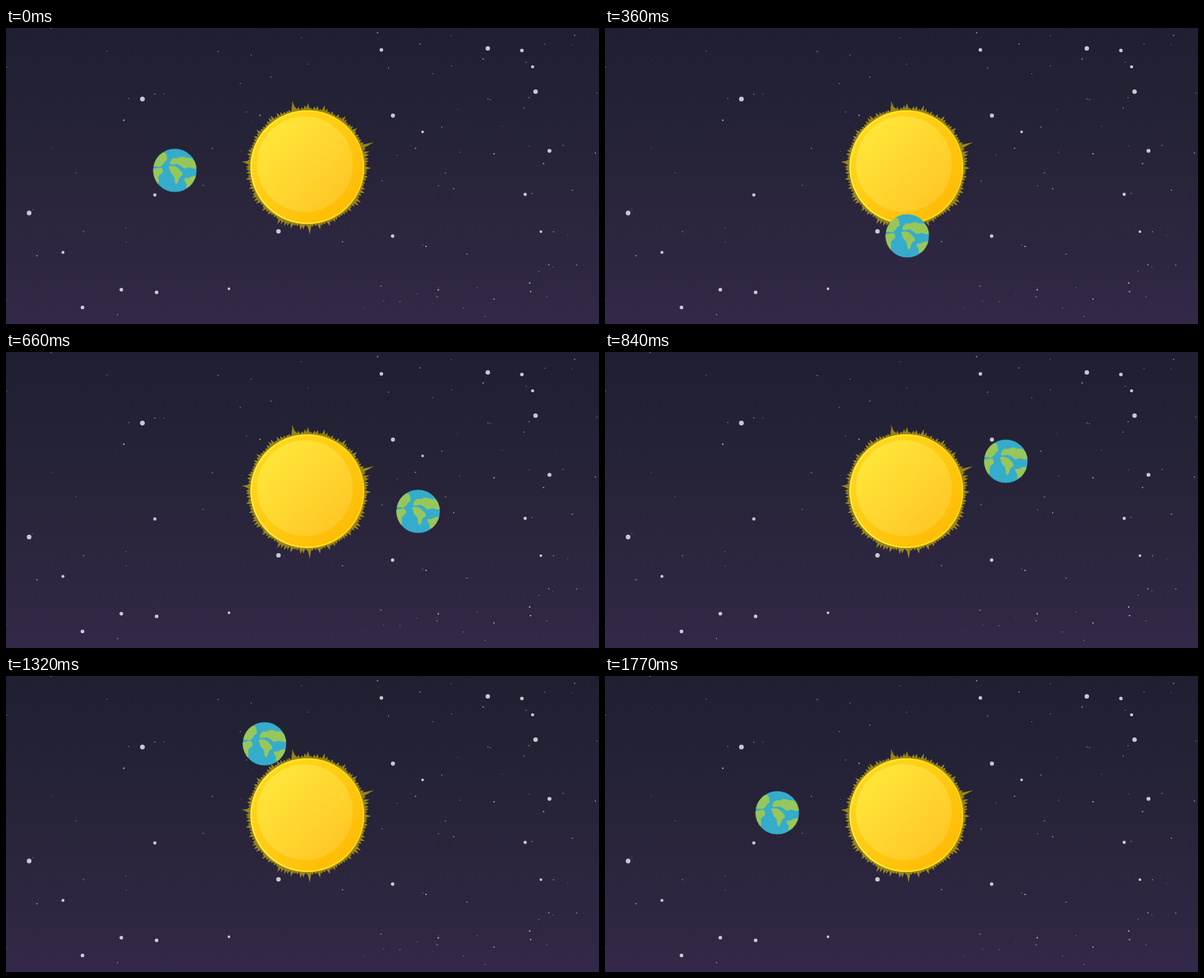
An HTML page for the animation above (1800 ms loop, 1000x500 px).

```html
<!DOCTYPE html>
<html lang="en">
<head>
<meta charset="utf-8">
<title>Planet orbit</title>
<style>
  html, body { margin: 0; width: 100%; height: 100%; overflow: hidden; }
  body { position: relative; background: linear-gradient(#1e2032, #282439 50%, #332848); }
  svg { position: absolute; left: 0; top: 0; }
  #sun { z-index: 1; }
</style>
</head>
<body>
<svg id="sky" width="1000" height="500" fill="#d8d5dc"></svg>

<svg id="earth" width="76" height="76" viewBox="-38 -38 76 76">
  <clipPath id="globe"><circle r="36.8"/></clipPath>
  <g clip-path="url(#globe)">
    <circle r="36.8" fill="#35accb"/>
    <g fill="#97c75b">
      <path d="M-40-7L-30-30L-16-30Q-13-25-13-20Q-12-17-17-15Q-18-11-21-9Q-25-4-30-7Z"/>
      <path d="M-40-3Q-30-3-23-5Q-20-2-20 2Q-21 5-26 8Q-29 12-27 16L-28 24L-36 20Z"/>
      <path d="M-8-13Q-6-21 0-21Q5-20 9-23Q15-24 19-21Q25-22 29-20L34-15L38-4Q33-2 28-4Q24-6 20-4Q15-2 13-5Q9-9 3-11Q-3-9-8-10Z"/>
      <path d="M-10-7Q-4-8 0-7Q5-5 8-1Q13 3 13 8Q9 10 7 13Q6 19 4 22Q1 24 0 20Q0 14-2 9Q-8 5-8 0Q-8-3-10-4Z"/>
      <path d="M38 9Q30 9 26 11Q23 14 16 13Q15 17 18 20Q21 23 18 29L27 28Z"/>
    </g>
  </g>
</svg>

<svg id="sun" width="1000" height="500">
  <defs>
    <linearGradient id="rim" x1="0.1" y1="0.1" x2="0.9" y2="0.9">
      <stop offset="0" stop-color="#ffd91f"/><stop offset="1" stop-color="#ffba04"/>
    </linearGradient>
    <linearGradient id="face" x1="0.15" y1="0.15" x2="0.85" y2="0.85">
      <stop offset="0" stop-color="#ffe539"/><stop offset="1" stop-color="#ffc826"/>
    </linearGradient>
    <linearGradient id="shine" x1="0" y1="0.6" x2="1" y2="0.4">
      <stop offset="0" stop-color="#fff04a"/><stop offset="0.5" stop-color="#ffea1c"/>
      <stop offset="1" stop-color="#ffd60f"/>
    </linearGradient>
  </defs>
  <g transform="translate(508.2 235)">
    <path id="corona" fill="#d9bb0c" fill-opacity="0.64"/>
    <circle r="96" fill="url(#rim)"/>
    <circle r="94.9" fill="none" stroke="url(#shine)" stroke-width="2.2"/>
    <circle cx="-4.2" cy="-5" r="80.8" fill="url(#face)"/>
  </g>
</svg>

<script>
const LOOP = 1800, FRAMES = 60;
const byId = id => document.getElementById(id);

let seed = 7;
const random = (low = 0, high = 1) => {
  seed = seed * 16807 % 2147483647;
  return low + (high - low) * seed / 2147483647;
};

// Landmark stars (x, y, radius) over a seeded field of faint ones
const landmarks = [
  [230,120,4],[633,37,3],[812.5,34.5,3.8],[870,38,3],[888,65.5,2.6],[893,107.5,3.8],
  [652.5,148,3.4],[702.5,175.5,2.2],[916.5,207.5,3.3],[875.5,281,2.7],[902,344,2.2],
  [652,351.5,2.9],[459.5,343.5,3.8],[251,282,2.7],[39,312.5,3.9],[96,379,2.5],
  [194.5,442,3.1],[254,446.5,3.1],[129,472,3.1],[376,440.5,2.2]
];
const star = (x, y, r, opacity) => `<circle cx="${x}" cy="${y}" r="${r}" opacity="${opacity}"/>`;
const faintStar = () => star(random(0, 1000), random(0, 500), random(0.6, 1.3), random(0.35, 0.8));
byId("sky").innerHTML = landmarks.map(s => star(...s, 0.92)).join("") +
  Array.from({ length: 95 }, faintStar).join("");

// Corona: overlapping seeded flames and four long ones (degrees, length)
const longFlames = [[-103,19], [-20.5,24], [184.6,15], [88,18]];
const shortFlames = Array.from({ length: 120 }, (_, i) => [i * 3 + random(), 5 + 8 * random() ** 2]);
const polar = (deg, r) => {
  const a = deg * Math.PI / 180;
  return `${(r * Math.cos(a)).toFixed(1)} ${(r * Math.sin(a)).toFixed(1)}`;
};
const flame = ([deg, length]) =>
  `M${polar(deg - 3, 94)}Q${polar(deg - 1, 97 + length * 0.35)} ${polar(deg, 96 + length)}` +
  `Q${polar(deg + 1, 97 + length * 0.35)} ${polar(deg + 3, 94)}Z`;
byId("corona").setAttribute("d", [...shortFlames, ...longFlames].map(flame).join(""));

// Orbit: key points (time, x, y) joined by a smooth cubic
const orbit = [
  [0,284.8,240.5], [210,391.5,336.5], [480,601,335], [690,700.5,256], [840,676,184.5],
  [1080,563,115], [1320,436,114.5], [1620,308,172], [1770,290.5,231]
];
const startVelocity = [0.3, 0.58], endVelocity = [-0.08, 0.38];

function velocity(i, axis) {
  if (i === 0) return startVelocity[axis - 1];
  if (i === orbit.length - 1) return endVelocity[axis - 1];
  const [a, b, c] = orbit.slice(i - 1, i + 2);
  const before = b[0] - a[0], after = c[0] - b[0];
  return ((b[axis] - a[axis]) / before * after + (c[axis] - b[axis]) / after * before) / (before + after);
}

function positionAt(time, axis) {
  const next = orbit.findIndex(p => p[0] > time);
  const i = next < 0 ? orbit.length - 2 : next - 1;
  const a = orbit[i], b = orbit[i + 1], span = b[0] - a[0];
  const u = (time - a[0]) / span, v = 1 - u;
  return v * v * (1 + 2 * u) * a[axis] + u * u * (3 - 2 * u) * b[axis] +
    span * u * v * (v * velocity(i, axis) - u * velocity(i + 1, axis));
}

// The planet passes in front of the sun below and behind it above.
const keyframes = Array.from({ length: FRAMES + 1 }, (_, i) => {
  const time = Math.min(i, FRAMES - 1) * LOOP / FRAMES;
  const x = positionAt(time, 1), y = positionAt(time, 2);
  return {
    offset: i / FRAMES,
    easing: "step-end",
    transform: `translate(${(x - 38).toFixed(2)}px, ${(y - 38).toFixed(2)}px)`,
    zIndex: y > 235 ? 2 : 0
  };
});
byId("earth").animate(keyframes, { duration: LOOP, iterations: Infinity });
</script>
</body>
</html>
```
